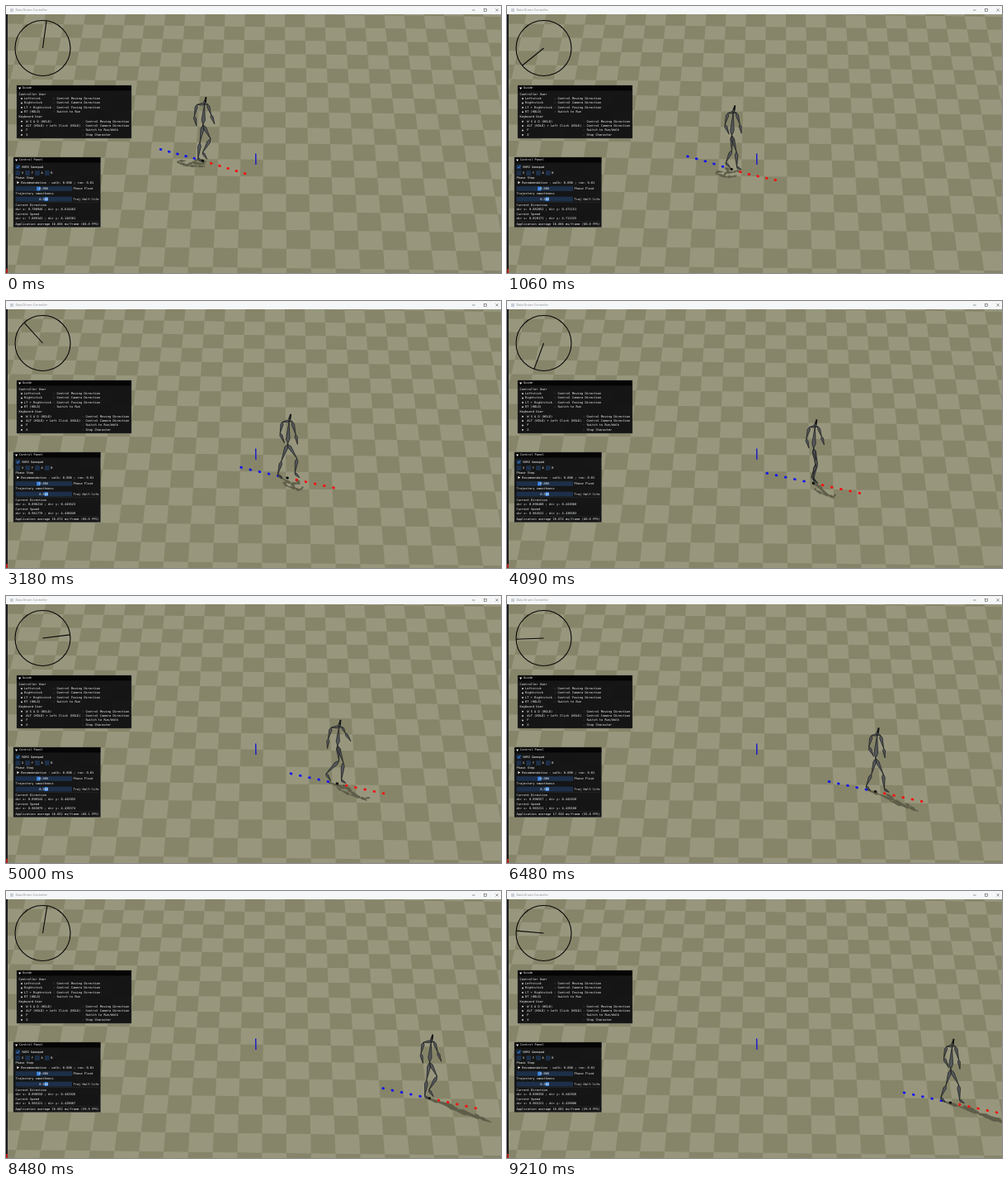
An HTML page with a canvas that plays this animation: 600x323 px, repeating every 9.24 s.

```html
<!DOCTYPE html>
<html lang="en">
<head>
<meta charset="utf-8">
<title>Data Driven Controller</title>
<style>
html, body { margin: 0; width: 100%; height: 100%; overflow: hidden; background: #96957c; }
canvas { position: absolute; left: 0; top: 0; width: 600px; height: 323px; }
</style>
</head>
<body>
<canvas id="floor" width="600" height="323"></canvas>
<canvas id="scene" width="600" height="323"></canvas>
<script>
const LOOP = 9240;
const MONO = '"DejaVu Sans Mono", monospace';
const floor = document.getElementById('floor').getContext('2d');
const ctx = document.getElementById('scene').getContext('2d');

// Piecewise linear lookup through [x, y] points, extended at both ends.
function lerpAt(points, x) {
  let i = 1;
  while (i < points.length - 1 && x > points[i][0]) i++;
  const [x0, y0] = points[i - 1], [x1, y1] = points[i];
  return y0 + (y1 - y0) * (x - x0) / (x1 - x0);
}

const PHASE = [[0, 82], [5000, 727], [6480, 902], [9210, 1255]];
const ROOT_X = [[82, 238.5], [360, 307], [1255, 537.5]];
const PATH_Y = [[187, 173.3], [238, 187], [289, 202.5], [318, 209], [594, 268]];
const LIGHT = { x: 315, y: 172, height: 300 };
const CHAINS = ['hips neck head', 'neck shoulderA elbowA handA', 'neck shoulderB elbowB handB',
  'hips kneeA ankleA toeA', 'hips kneeB ankleB toeB'].map(c => c.split(' '));

// Joint offsets from the ground point as a gait cycle of one harmonic.
function poseAt(phase) {
  const a = phase * Math.PI / 180, cos = Math.cos(a), sin = Math.sin(a);
  const wave = (mean, c, s) => mean + c * cos + s * sin;
  const pose = {
    head: [4, -77],
    neck: [2, -68.7],
    hips: [0.3, wave(-43, -3, 0)],
    shoulderA: [wave(-6, -1.3, -1), -67.8],
    elbowA: [wave(-9.5, -1.5, -0.5), -54],
    handA: [wave(-7, -5, 0), -42.3],
    shoulderB: [5.8, -68.3],
    elbowB: [10, wave(-56.5, -4.5, 1.5)],
    handB: [wave(14, 2.5, 0), wave(-46, -5.5, 2.5)],
    kneeA: [wave(1.5, 6.5, -6), wave(-23.5, -2.5, 2)],
    ankleA: [wave(-3, 8.5, -4), wave(-5.2, 1, 2.5)],
    kneeB: [wave(5.5, -4, 4.5), wave(-24.5, -3, -1.5)],
    ankleB: [wave(-1.5, -12.5, 3), wave(-7.3, -4.5, -2)]
  };
  pose.toeA = [pose.ankleA[0] + 5.5, wave(-0.6, 0, 1.7)];
  pose.toeB = [pose.ankleB[0] + 5.5, wave(-1.2, -2, -0.5)];
  return pose;
}

function addBone(shape, a, b, scale) {
  const dx = b[0] - a[0], dy = b[1] - a[1], len = Math.hypot(dx, dy) || 1;
  const half = scale * Math.min(2.3, 1 + len * 0.045);
  const mx = a[0] + dx * 0.22, my = a[1] + dy * 0.22;
  const nx = -dy / len * half, ny = dx / len * half;
  shape.moveTo(a[0], a[1]);
  shape.lineTo(mx + nx, my + ny);
  shape.lineTo(b[0], b[1]);
  shape.lineTo(mx - nx, my - ny);
  shape.closePath();
}

function skeleton(pose, place, scale) {
  const shape = new Path2D();
  for (const chain of CHAINS) {
    for (let i = 1; i < chain.length; i++) {
      addBone(shape, place(pose[chain[i - 1]]), place(pose[chain[i]]), scale);
    }
  }
  return shape;
}

function rect(c, x, y, w, h, color) {
  c.fillStyle = color;
  c.fillRect(x, y, w, h);
}

function line(c, x0, y0, x1, y1, color, width) {
  c.strokeStyle = color;
  c.lineWidth = width;
  c.beginPath();
  c.moveTo(x0, y0);
  c.lineTo(x1, y1);
  c.stroke();
}

function drawFloor() {
  const horizon = -1294, mid = 1460, cellW = 27, cellH = 19.5;
  const rowY = n => horizon + 1 / (1 / mid - n * cellH / (mid * mid));
  const px = (c, y) => 312 + c * cellW * (y - horizon) / mid;
  rect(floor, 0, 0, 600, 323, '#98977e');
  floor.save();
  floor.translate(300, 166);
  floor.rotate(0.012);
  floor.translate(-300, -166);
  floor.fillStyle = '#868569';
  for (let r = -11; r < 11; r++) {
    const y0 = rowY(r), y1 = rowY(r + 1);
    for (let c = -16; c < 16; c++) {
      if ((r + c) & 1) continue;
      floor.beginPath();
      floor.moveTo(px(c, y0), y0);
      floor.lineTo(px(c + 1, y0), y0);
      floor.lineTo(px(c + 1, y1), y1);
      floor.lineTo(px(c, y1), y1);
      floor.fill();
    }
  }
  floor.restore();
  rect(floor, 0, 10, 2, 313, '#17191c');
  rect(floor, 0, 318, 2, 5, '#b01818');
}

function drawTitleBar() {
  rect(floor, 0, 0, 600, 10, '#f5f6f8');
  rect(floor, 5, 3, 4, 4, '#c9ced6');
  floor.font = '3.7px "Open Sans", sans-serif';
  floor.fillStyle = '#858585';
  floor.fillText('Data Driven Controller', 11.5, 6.4);
  const ink = '#555';
  line(floor, 565, 5, 568.5, 5, ink, 0.6);
  floor.strokeRect(579.5, 3.3, 3, 3);
  line(floor, 593.5, 3.3, 596.7, 6.5, ink, 0.6);
  line(floor, 596.7, 3.3, 593.5, 6.5, ink, 0.6);
}

function text(str, x, y) {
  ctx.fillStyle = '#f4f4f4';
  ctx.fillText(str, x, y);
}

function panel(x, y, w, h, title) {
  rect(ctx, x, y, w, h, 'rgba(14,15,16,.95)');
  rect(ctx, x, y, w, 6.4, '#050505');
  ctx.strokeStyle = '#3c3c42';
  ctx.lineWidth = 0.35;
  ctx.strokeRect(x, y, w, h);
  triangle(x + 3.6, y + 3.3, Math.PI / 2);
  text(title, x + 7, y + 3.3);
}

function triangle(x, y, turn) {
  ctx.fillStyle = '#f4f4f4';
  ctx.beginPath();
  for (let i = 0; i < 3; i++) {
    const a = turn + i * Math.PI * 2 / 3;
    ctx.lineTo(x + 1.8 * Math.cos(a), y + 1.8 * Math.sin(a));
  }
  ctx.fill();
}

// Each row is "key|action".
function guideRows(y, keyX, actionX, rows) {
  rows.forEach((entry, i) => {
    const [key, action] = entry.split('|'), rowY = y + i * 5.4;
    rect(ctx, 18.2, rowY - 0.8, 1.6, 1.6, '#f4f4f4');
    text(key, keyX, rowY);
    text('- ' + action, actionX, rowY);
  });
}

function drawGuide() {
  panel(13, 96, 139, 64, 'Guide');
  text('Controller User', 15.5, 106.7);
  guideRows(112.1, 22, 57, ['Leftstick|Control Moving Direction', 'Rightstick|Control Camera Direction',
    'LT + Rightstick|Control Facing Direction', 'RT (HOLD)|Switch to Run']);
  text('Keyboard User', 15.5, 134);
  guideRows(139.7, 24.3, 92, ['W S A D (HOLD)|Control Moving Direction',
    'ALT (HOLD) + Left Click (HOLD)|Control Camera Direction', 'F|Switch to Run/Walk', 'X|Stop Character']);
}

function checkbox(x, y, label, on) {
  rect(ctx, x, y - 2.9, 5.8, 5.8, '#1d2f49');
  if (on) {
    line(ctx, x + 1.2, y, x + 2.5, y + 1.5, '#4296fa', 0.9);
    line(ctx, x + 2.5, y + 1.5, x + 4.7, y - 1.6, '#4296fa', 0.9);
  }
  text(label, x + 7.4, y);
}

function slider(y, grab, value, label) {
  rect(ctx, 11.5, y - 2.9, 68.5, 5.8, '#1d2f49');
  rect(ctx, grab, y - 2.4, 4.2, 4.8, '#3d85e0');
  text(value, 40.2, y);
  text(label, 81.6, y);
}

function frameTime(t) {
  if (t >= 8400) return 16.682;
  if (t >= 6000) return 17.91;
  if (t >= 4200) return 16.652;
  if (t >= 2850) return 16.674;
  return t >= 1500 ? 16.681 : 16.666;
}

function drawControls(t) {
  const x = 11.5, ms = frameTime(t);
  const angle = 0.45886 + 0.2032 * Math.exp(-1.75 * t / 1000);
  const pair = k => `dir x: ${(Math.cos(angle) * k).toFixed(6)} ; dir y: ${(Math.sin(angle) * k).toFixed(6)}`;
  panel(9, 183, 105.5, 84.5, 'Control Panel');
  checkbox(x, 194.7, 'VURO Gamepad', true);
  [...'XYAB'].forEach((name, i) => checkbox(x + i * 11.8, 202, name, false));
  text('Phase Step', x, 208.3);
  triangle(14.3, 213.6, 0);
  text('Recommendation - walk: 0.006 ; run: 0.01', 18.2, 213.6);
  slider(221, 37.2, '0.006', 'Phase Float');
  text('Trajectory smoothness', x, 227.5);
  slider(233.6, 46.6, '0.500', 'Traj Half-life');
  line(ctx, x, 237.3, 112, 237.3, '#3c3c42', 0.4);
  ['Current Direction', pair(1), 'Current Speed', pair(9.9996)]
    .forEach((str, i) => text(str, x, 241 + i * 5.45));
  line(ctx, x, 260.4, 112, 260.4, '#3c3c42', 0.4);
  text(`Application average ${ms.toFixed(3)} ms/frame (${(1000 / ms).toFixed(1)} FPS)`, x, 263.8);
}

function drawDial(phase) {
  const a = phase * Math.PI / 180, x = 44.5, y = 51, r = 33.5;
  line(ctx, x, y, x + r * Math.cos(a), y - r * Math.sin(a), '#080808', 1.1);
  ctx.beginPath();
  ctx.arc(x, y, r, 0, Math.PI * 2);
  ctx.stroke();
}

function drawCharacter(t, phase) {
  const slope = 0.235;
  const cx = lerpAt(ROOT_X, phase), cy = lerpAt(PATH_Y, cx);
  const pose = poseAt(phase);
  const onBody = ([x, y]) => [cx + x, cy + y];
  const onGround = ([x, y]) => {
    const gx = cx + x, gy = cy + slope * x;
    const up = Math.max(0, slope * x - y), s = up / (LIGHT.height - up);
    return [gx + s * (gx - LIGHT.x), gy + s * (gy - LIGHT.y)];
  };

  const shadow = skeleton(pose, onGround, 0.9);
  ctx.fillStyle = ctx.strokeStyle = '#5d5d4a';
  ctx.lineWidth = 0.8;
  ctx.fill(shadow);
  ctx.stroke(shadow);

  const step = 10.2 + Math.min(1, t / 2500);
  for (let i = -5; i <= 5; i++) {
    const x = cx + i * step;
    ctx.fillStyle = i < 0 ? '#1515ee' : i > 0 ? '#f31212' : '#0a0a0a';
    ctx.beginPath();
    ctx.ellipse(x, lerpAt(PATH_Y, x), 1.8, 1.5, 0.2, 0, Math.PI * 2);
    ctx.fill();
  }

  const body = skeleton(pose, onBody, 1);
  ctx.fillStyle = '#55585b';
  ctx.fill(body);
  ctx.strokeStyle = '#1b1c1e';
  ctx.lineWidth = 0.75;
  ctx.lineJoin = 'round';
  ctx.stroke(body);
  const [hx, hy] = onBody(pose.head);
  line(ctx, hx, hy, hx - 1, hy + 6, '#141414', 2);
}

function draw(t) {
  const phase = lerpAt(PHASE, t);
  ctx.clearRect(0, 0, 600, 323);
  drawCharacter(t, phase);
  line(ctx, 302.7, 178.5, 302.9, 192, '#1717cc', 1.4);
  drawDial(phase);
  ctx.font = '3.66px ' + MONO;
  ctx.textBaseline = 'middle';
  drawGuide();
  drawControls(t);
}

const start = performance.now();
function tick() {
  draw((performance.now() - start) % LOOP);
  requestAnimationFrame(tick);
}
drawFloor();
drawTitleBar();
tick();
</script>
</body>
</html>
```
